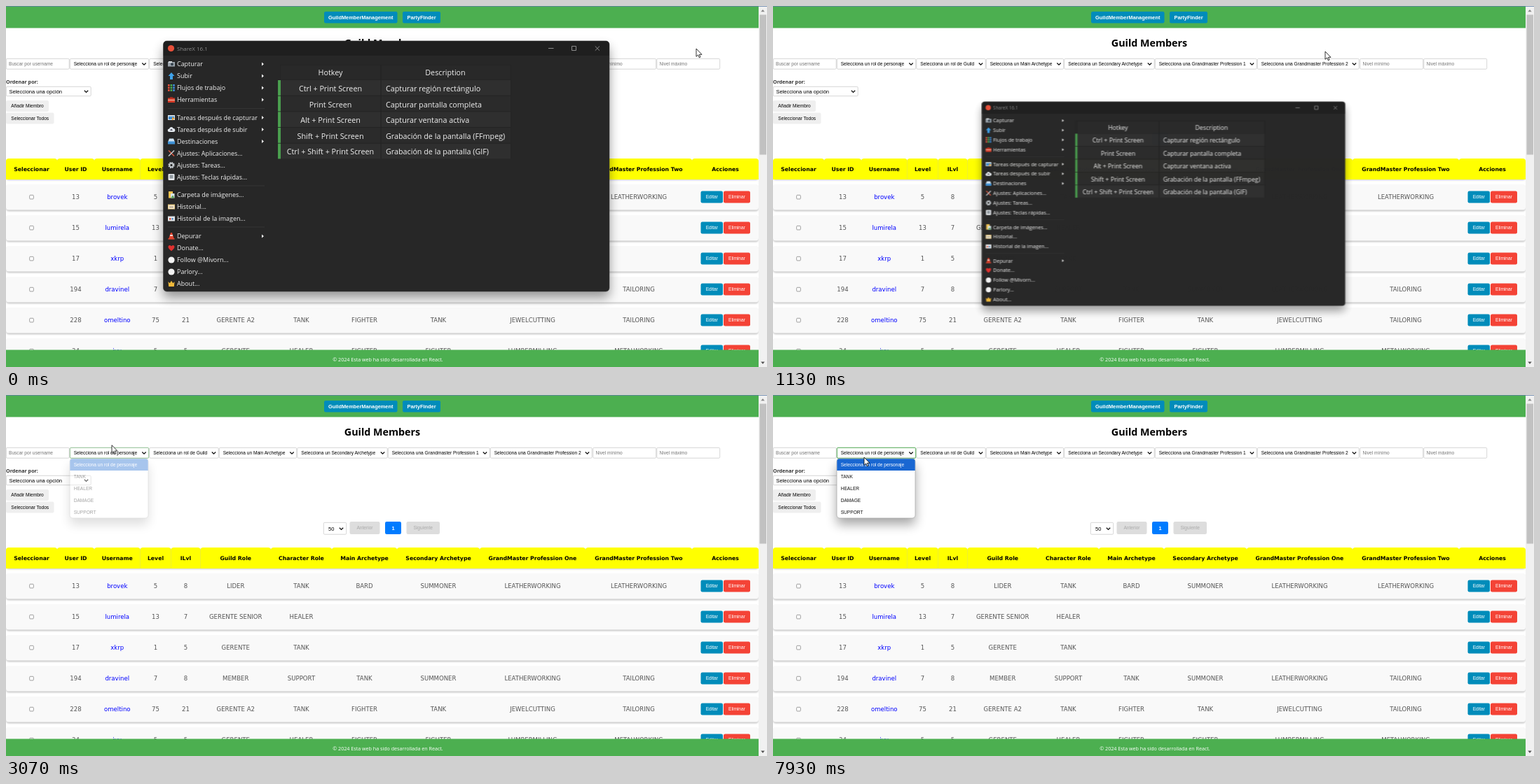
An HTML page that plays this animation: 1086x516 px, repeating every 8000 ms.

```html
<!DOCTYPE html>
<html lang="es">
<head>
<meta charset="utf-8">
<title>Guild Members</title>
<style>
html, body { margin: 0; width: 100%; height: 100%; overflow: hidden; background: #fff; }
svg { display: block; width: 1086px; height: 516px; }
text { white-space: pre; }
.ui { font-family: "Liberation Sans", Arial, sans-serif; font-size: 6.6px; }
.ui.big { font-size: 7.5px; }
.nav { font: bold 7.4px "Liberation Sans", Arial, sans-serif; }
.cell { font: 8.55px "DejaVu Sans", Verdana, sans-serif; fill: #555; }
.head { font: bold 7.75px "DejaVu Sans", Verdana, sans-serif; }
.title { font: bold 14.3px "Open Sans", sans-serif; }
.label { font: bold 7.15px "Open Sans", sans-serif; fill: #333; }
.foot { font: 7.15px "Open Sans", sans-serif; fill: #fff; }
.menu { font: 8.95px "Open Sans", sans-serif; fill: #f0f0f0; }
.bar { font: 8px "Open Sans", sans-serif; fill: currentColor; }
.key { font: 10.75px "Open Sans", sans-serif; fill: #f0f0f0; }
.mid { text-anchor: middle; }

#win, #caption, #glow, #hover, #list, #focus, #pointer { animation: 8s linear infinite; }
#win { transform-origin: 621px 517px; animation-name: minimize; }
#caption { animation-name: caption; animation-timing-function: step-end; }
#glow { animation-name: glow; animation-timing-function: step-end; }
#hover { animation-name: hover; animation-timing-function: step-end; }
#focus { animation-name: focus; }
#list { animation-name: open; }
#pointer { animation-name: move; }

@keyframes minimize {
  0%, 11.6% { transform: scale(1); opacity: 1; }
  12.5% { transform: scale(.98); }
  13.3% { transform: scale(.92); }
  14.12% { transform: scale(.8175); opacity: 1; }
  15% { transform: scale(.65); opacity: .8; }
  15.9% { transform: scale(.47); opacity: .3; }
  16.6%, 100% { transform: scale(.35); opacity: 0; }
}
@keyframes caption {
  0% { color: #8c8c8c; }
  10.8% { color: #fff; }
  12.4%, 100% { color: #8c8c8c; }
}
@keyframes glow {
  0% { opacity: 0; }
  10.8% { opacity: 1; }
  12.4%, 100% { opacity: 0; }
}
@keyframes hover {
  0% { opacity: 0; }
  9.1% { opacity: 1; }
  11.6%, 100% { opacity: 0; }
}
@keyframes focus {
  0%, 36.6% { opacity: 0; }
  40%, 100% { opacity: 1; }
}
@keyframes open {
  0%, 37.4% { opacity: 0; }
  40%, 100% { opacity: 1; }
}
@keyframes move {
  0%, .8% { transform: translate(985px, 61px); }
  3.3% { transform: translate(1002px, 58px); }
  5% { transform: translate(978px, 57px); }
  7.5% { transform: translate(860px, 61px); }
  9.2% { transform: translate(800px, 65px); }
  10.8% { transform: translate(789px, 66px); }
  14.1%, 17.5% { transform: translate(788px, 65px); }
  18.4% { transform: translate(812px, 60px); }
  19.4% { transform: translate(700px, 70px); }
  20.87% { transform: translate(430px, 84px); }
  23% { transform: translate(210px, 87px); }
  25.5% { transform: translate(128px, 85px); }
  28.4%, 30% { transform: translate(113px, 81px); }
  34.1%, 36% { transform: translate(150px, 70px); }
  43.4%, 46% { transform: translate(153px, 75px); }
  47.5%, 81.6% { transform: translate(154px, 76px); }
  82.5% { transform: translate(146px, 81px); }
  84.1%, 85% { transform: translate(139px, 89px); }
  90.9%, 97.5% { transform: translate(137px, 92px); }
  99.1%, 100% { transform: translate(130px, 89px); }
}
</style>
</head>
<body>
<svg id="stage" viewBox="0 0 1086 516" xmlns="http://www.w3.org/2000/svg"></svg>
<script>
const rect = (x, y, w, h, fill, extra = '') =>
  `<rect x="${x}" y="${y}" width="${w}" height="${h}" fill="${fill}" ${extra}/>`;
const text = (x, y, cls, s, extra = '') =>
  `<text x="${x}" y="${y}" dy=".36em" class="${cls}" ${extra}>${s}</text>`;
const path = (d, fill, extra = '') => `<path d="${d}" fill="${fill}" ${extra}/>`;
const line = (d, color, width = 1) => path(d, 'none', `stroke="${color}" stroke-width="${width}"`);
const at = (x, y, body) => `<g transform="translate(${x} ${y})">${body}</g>`;
const field = (x, y, w, h) => rect(x + .3, y + .3, w - .6, h - .6, '#fff', 'rx="1.5" stroke="#c4c4c4" stroke-width=".7"');
const chevron = (x, y) => line(`M${x - 2.7} ${y - 1.3}l2.7 2.7 2.7-2.7`, '#111', 1.3);
const button = (x, y, w, h, fill, label, cls = 'ui', color = '#fff') =>
  rect(x, y, w, h, fill, 'rx="2.2"') + text(x + w / 2, y + h / 2, cls + ' mid', label, `fill="${color}"`);

const GREEN = '#4caf50', BLUE = '#008cba';
const edges = [0, 73, 126, 191.5, 235.5, 277.5, 378, 465, 558, 676, 827, 979, 1074];
const center = i => (edges[i] + edges[i + 1]) / 2;

function filters() {
  const selects = [
    [91, 113, 'rol de personaje'], [204.5, 99, 'rol de Guild'], [304, 111, 'Main Archetype'],
    [415.5, 129, 'Secondary Archetype'], [545, 145.5, 'Grandmaster Profession 1'],
    [691, 145.5, 'Grandmaster Profession 2']
  ];
  const inputs = [[0, 'Buscar por username'], [837.5, 'Nivel mínimo'], [928.5, 'Nivel máximo']];
  return inputs.map(([x, s]) => field(x, 75, 90.5, 15.5) + text(x + 4, 83, 'ui', s, 'fill="#757575"')).join('') +
    selects.map(([x, w, s]) => field(x, 75, w, 15.5) + chevron(x + w - 7, 82.8) +
      text(x + 5.7, 83, 'ui', `Selecciona un${s.startsWith('Grand') ? 'a' : ''} ${s}`)).join('');
}

function table() {
  const heads = ['Seleccionar', 'User ID', 'Username', 'Level', 'ILvl', 'Guild Role', 'Character Role',
    'Main Archetype', 'Secondary Archetype', 'GrandMaster Profession One', 'GrandMaster Profession Two', 'Acciones'];
  const rows = [
    '13|brovek|5|8|LIDER|TANK|BARD|SUMMONER|LEATHERWORKING|LEATHERWORKING',
    '15|lumirela|13|7|GERENTE SENIOR|HEALER',
    '17|xkrp|1|5|GERENTE|TANK',
    '194|dravinel|7|8|MEMBER|SUPPORT|TANK|SUMMONER|LEATHERWORKING|TAILORING',
    '228|omeltino|75|21|GERENTE A2|TANK|FIGHTER|TANK|JEWELCUTTING|TAILORING',
    '34|ivu|5|5|GERENTE|HEALER|FIGHTER|FIGHTER|LUMBERMILLING|METALWORKING'
  ];
  let out = rect(0, 220, 1074, 28.5, '#000', 'rx="4" opacity=".25" filter="url(#soft)"');
  heads.forEach((s, i) => {
    const x = edges[i], r = edges[i + 1];
    out += path(`M${x} 248V222q0-4 4-4H${r - 4}q4 0 4 4V248z`, '#ff0') + text(center(i), 233, 'head mid', s);
  });
  rows.forEach((row, n) => {
    const y = 273 + 44 * n;
    out += rect(0, y - 16, 1074, 36, '#000', 'rx="4" opacity=".22" filter="url(#soft)"') +
      rect(0, y - 18, 1074, 36.5, '#f9f9f9', 'rx="4"') +
      rect(33.7, y - 2.7, 5.6, 5.6, '#fff', 'rx="1" stroke="#767676" stroke-width=".7"') +
      row.split('|').map((s, i) => text(center(i + 1), y, 'cell mid', s, i == 1 ? 'style="fill:#00f"' : '')).join('') +
      button(991.5, y - 8.5, 31.5, 17, BLUE, 'Editar') + button(1024, y - 8.5, 38, 17, '#f44336', 'Eliminar');
  });
  return out;
}

function page() {
  return rect(0, 0, 1074, 31.5, GREEN) +
    button(454, 8, 104.5, 16.5, BLUE, 'GuildMemberManagement', 'nav') +
    button(566, 8, 54, 16.5, BLUE, 'PartyFinder', 'nav') +
    text(537, 53, 'title mid', 'Guild Members') + filters() +
    text(0, 108, 'label', 'Ordenar por:') + field(0, 115, 121.5, 14) +
    text(4.5, 122, 'ui big', 'Selecciona una opción') + chevron(114.5, 122) +
    button(0, 135, 61, 16, '#efefef', 'Añadir Miembro', 'ui', '#000') +
    button(0, 152.5, 68.5, 16, '#efefef', 'Seleccionar Todos', 'ui', '#000') +
    field(453, 182, 33, 17.5) + text(460, 191, 'ui big', '50') + chevron(478.5, 191) +
    button(490.5, 181, 43, 18, '#ddd', 'Anterior', 'ui', '#aaa') +
    button(541, 181, 23, 18, '#007bff', '1', 'nav') +
    button(571.5, 181, 47.5, 18, '#ddd', 'Siguiente', 'ui', '#aaa') +
    table() +
    rect(0, 491.5, 1074, 24.5, GREEN) +
    text(545, 505, 'foot mid', '© 2024 Esta web ha sido desarrollada en React.') +
    rect(1074, 0, 12, 516, '#f1f1f1') + rect(1075.5, 12.5, 9.5, 200, '#c1c1c1') +
    path('M1077.3 8.3h5.4l-2.7-3.2z', '#8a8a8a') + path('M1077.3 508.5h5.4l-2.7 3.2z', '#505050') +
    rect(0, 0, 1086, .8, '#5f7fa8');
}

// Menu icons on a 10 by 10 grid.
const picture = (frame, fill) => rect(0, 1.5, 10, 7, frame) + rect(1, 3.2, 8, 4.3, fill);
const disc = fill => `<circle cx="5" cy="5" r="4.6" fill="${fill}"/>`;
const icons = {
  camera: rect(0, 2, 10, 6.5, '#9aa3ab') + rect(1, 1, 5, 2, '#d5dade') + '<circle cx="6" cy="5.3" r="2" fill="#36424c"/>',
  up: path('M5 0L9.5 5H7v5H3V5H.5z', '#3fa2ea'),
  grid: [0, 1, 2].map(r => ['#e5533c', '#4caf50', '#3f8fe0'].map((c, i) =>
    rect(i * 3.6, r * 3.6, 2.6, 2.6, c)).join('')).join(''),
  toolbox: rect(0, 2.5, 10, 6.5, '#d8402c') + rect(3, 1, 4, 1.5, '#a52a1c') + rect(0, 5, 10, .9, '#f3d4c4'),
  after: picture('#dfe8ef', '#3d8bd0') + path('M6 4l4 2.5L6 9z', '#f0a030'),
  cloud: path('M2 8.5a2.3 2.3 0 0 1 0-4.6 3 3 0 0 1 5.7-.4A2.5 2.5 0 0 1 8 8.5z', '#e4e9ee') + path('M5 4l2 2.4H3z', '#445'),
  drive: path('M2 1h6l2 5H0z', '#cfe3f3') + rect(0, 5, 10, 4, '#3f92d6'),
  tools: line('M1 1l8 8', '#d9573f', 1.6) + line('M9 1L1 9', '#c3c9ce', 1.6),
  gear: '<circle cx="5" cy="5" r="3.4" fill="none" stroke="#c9ced2" stroke-width="2.4" stroke-dasharray="1.8 .85"/>' +
    '<circle cx="5" cy="5" r="2.4" fill="none" stroke="#c9ced2" stroke-width="1.5"/>',
  keycap: rect(.5, .5, 9, 9, '#e8ebee', 'rx="1"') + rect(2.5, 2, 5, 5, '#8f979e'),
  folder: rect(1, 0, 6, 9.5, '#f2c452') + rect(4, 3, 5.5, 6.5, '#d9e6ee') + path('M4 9.5l3-4 2.5 4z', '#58a35a'),
  log: picture('#e5c883', '#f7efe0') + line('M2 5.3h6', '#7d6a45'),
  gallery: picture('#d9dde0', '#f4f4f4') + rect(2, 4, 2.4, 2.6, '#d0503d') + rect(5.4, 4, 2.4, 2.6, '#4b8ec9'),
  cone: path('M4 0h2l2.6 8H1.4z', '#e0452f') + rect(3, 3.2, 4, 1.5, '#fff') + rect(.5, 8, 9, 1.6, '#e0452f'),
  heart: path('M5 9.3C-3 3.6 1.5-1.2 5 2.2 8.5-1.2 13 3.6 5 9.3z', '#e0312f'),
  white: disc('#f2f2f2'),
  crown: path('M.5 2l2.2 2.3L5 .8l2.3 3.5L9.5 2 8.8 9H1.2z', '#f0b93a')
};

function menu() {
  const groups = [
    [83, 'camera:Capturar>', 'up:Subir>', 'grid:Flujos de trabajo>', 'toolbox:Herramientas>'],
    [159.5, 'after:Tareas después de capturar>', 'cloud:Tareas después de subir>', 'drive:Destinaciones>',
      'tools:Ajustes: Aplicaciones...', 'gear:Ajustes: Tareas...', 'keycap:Ajustes: Teclas rápidas...'],
    [270, 'folder:Carpeta de imágenes...', 'log:Historial...', 'gallery:Historial de la imagen...'],
    [329, 'cone:Depurar>', 'heart:Donate...', 'white:Follow @Mivorn...', 'white:Parlory...', 'crown:About...']
  ];
  return groups.map(([top, ...items], g) =>
    (g ? line(`M231 ${top - 13}H369`, '#343434') : '') +
    items.map((item, i) => {
      const y = top + 17 * i, cut = item.indexOf(':'), more = item.endsWith('>');
      return at(231, y - 5, icons[item.slice(0, cut)]) +
        text(244, y, 'menu', item.slice(cut + 1).replace('>', '')) +
        (more ? path(`M365 ${y - 2.5}l3 2.5-3 2.5z`, '#f0f0f0') : '');
    }).join('')).join('');
}

function hotkeys() {
  const keys = [
    ['Ctrl + Print Screen', 'Capturar región rectángulo'],
    ['Print Screen', 'Capturar pantalla completa'],
    ['Alt + Print Screen', 'Capturar ventana activa'],
    ['Shift + Print Screen', 'Grabación de la pantalla (FFmpeg)'],
    ['Ctrl + Shift + Print Screen', 'Grabación de la pantalla (GIF)']
  ];
  return rect(388, 84, 332.5, 134, '#222') + rect(388, 84, 3.5, 21, '#272727') +
    rect(392, 84.5, 142.5, 21, '#292929') + rect(535.5, 84.5, 184.5, 21, '#292929') +
    text(463, 95.5, 'key mid', 'Hotkey') + text(627, 95.5, 'key mid', 'Description') +
    keys.map(([key, what], i) => {
      const y = 118 + 22.65 * i, fill = i % 2 ? '#2b2b2b' : '#2f2f2f';
      return rect(388, y - 12, 4, 21.8, '#4a9e4e') + rect(392, y - 12, 142.5, 21.8, fill) +
        rect(535.5, y - 12, 184.5, 21.8, fill) + text(463, y, 'key mid', key) + text(542, y, 'key', what);
    }).join('');
}

function appWindow() {
  const frame = (fill, extra) => rect(224.5, 50, 636.5, 358, fill, 'rx="5" ' + extra);
  return `<g id="win">
    ${frame('#000', 'opacity=".4" filter="url(#shade)"')}
    <g id="glow">${frame('#000', 'opacity=".35" filter="url(#deep)"')}</g>
    ${frame('#272727', 'stroke="#3c3c3c" stroke-width=".6"')}
    ${path('M224.8 71V55q0-4.7 4.7-4.7H856q4.7 0 4.7 4.7V71z', '#1f1f1f')}
    <g id="hover">${rect(761.5, 51, 32.5, 19.5, '#2e2e2e')}</g>
    ${at(230.5, 55.5, disc('#e8503a'))}
    <g id="caption">${text(244, 61, 'bar', 'ShareX 16.1')}
      ${line('M774 60.5h7.5', 'currentColor')}
      ${line('M807.5 57.5h6v6h-6z', 'currentColor')}
      ${line('M840.8 57.5l6.2 6.2m0-6.2l-6.2 6.2', 'currentColor')}</g>
    ${menu()}${hotkeys()}</g>`;
}

function dropdown() {
  const options = ['Selecciona un rol de personaje', 'TANK', 'HEALER', 'DAMAGE', 'SUPPORT'];
  return `<g id="focus">${rect(91.3, 75.3, 112.4, 15, 'none', `rx="1.5" stroke="${GREEN}" stroke-width=".9"`)}</g>
    <g id="list">${rect(91, 91, 112, 85, '#000', 'rx="4" opacity=".35" filter="url(#shade)"')}
    ${rect(91, 91, 112, 85, '#fff', 'rx="4" stroke="#a5a5a5" stroke-width=".7"')}
    ${path('M91.3 108V95q0-3.7 3.7-3.7H199q3.7 0 3.7 3.7V108z', '#1967d2')}
    ${options.map((s, i) => text(96.7, 99.7 + 16.9 * i, 'ui', s, `fill="${i ? '#111' : '#fff'}"`)).join('')}</g>`;
}

const blur = (id, dy, dev) => `<filter id="${id}" x="-30%" y="-50%" width="160%" height="220%">
  <feOffset dy="${dy}"/><feGaussianBlur stdDeviation="${dev}"/></filter>`;

document.getElementById('stage').innerHTML =
  `<defs>${blur('soft', .3, 1)}${blur('shade', 9, 8)}${blur('deep', 15, 12)}</defs>` +
  page() + dropdown() + appWindow() +
  `<g id="pointer">${path('M0 0V11.3L2.6 8.9 4.3 12.8 6 12 4.4 8.3H8z', '#fff', 'stroke="#000" stroke-width=".8"')}</g>`;
</script>
</body>
</html>
```
